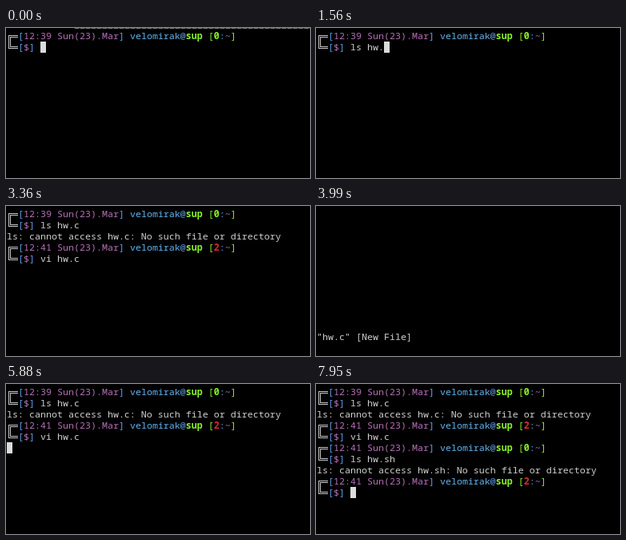
These frames come from a looping animation (380x188 px, 8 s). An HTML page:

```html
<!DOCTYPE html>
<html lang="en">
<head>
<meta charset="utf-8">
<title>Terminal session</title>
<style>
html, body { margin: 0; width: 100%; height: 100%; overflow: hidden; background: #000; }
#term {
  position: absolute; left: 0; top: 0; width: 380px; height: 188px;
  overflow: hidden; background: #000; color: #d0d0d0;
  font: 11.667px/14px "Noto Sans Mono", "DejaVu Sans Mono", monospace;
  font-variant-ligatures: none;
}
.row { position: absolute; left: 1px; height: 14px; white-space: pre; }
.blue { color: #5f9fee; }
.mauve { color: #b56fb5; }
.user { color: #62b4ee; }
.green { color: #87f02c; }
.red { color: #e02834; }
.inc { color: #62b4e4; }
.lib { color: #86c440; }
.dim { color: #263038; }
b { font-weight: 600; }
.status { color: #fff; font-weight: 600; }
.tag { display: inline-block; height: 14px; vertical-align: top; background: #d75f5f; color: #1c0808; }
.link {
  position: absolute; left: 3px; width: 12px; height: 17px; box-sizing: border-box;
  border: 3px double #c8c8c8; border-right: 0;
}
.cursor { position: absolute; width: 7px; height: 14px; background: #dcdcdc; }
.edge {
  position: absolute; left: 86px; top: 0; width: 294px; height: 1px;
  background: repeating-linear-gradient(90deg, #777 0 5px, #333 5px 7px);
}
</style>
</head>
<body>
<div id="term"></div>
<script>
const LOOP = 8000, CELL = 7, LINE = 14, LEFT = 1, TOP = 3;
const term = document.getElementById('term');
const paint = (name, text) => `<span class="${name}">${text}</span>`;
const bold = (name, text) => `<b class="${name}">${text}</b>`;
const open = paint('blue', '['), close = paint('blue', ']');

const header = (clock, code) =>
  '  ' + open + paint('mauve', clock + ' Sun(23).Mar') + close + ' ' +
  paint('user', 'velomirak') + paint('blue', '@') + bold('green', 'sup') + ' ' +
  paint('green', '[') + bold(code ? 'red' : 'green', code) +
  paint('blue', ':') + paint('mauve', '~') + paint('green', ']');
const missing = file => `ls: cannot access ${file}: No such file or directory`;

const include = lib => paint('inc', '#include') + ' ' + paint('lib', `&lt;${lib}&gt;`);
const source = [
  include('stdio.h'), include('stdlib.h'), '',
  'int main(int argc, char const* argv[]) {', '',
  '    fflush(stdout);',
  '    if (ferror(stdout)) exit(EXIT_FAILURE);',
  '    return EXIT_SUCCESS;', '}', paint('dim', '~')
];
const status = paint('status', paint('tag', '1 ') + ' ~/hw.c [c,utf-8,unix] o@o' +
  ' '.repeat(21) + paint('tag', '12:41'));
const notice = '"hw.c" [New File]';

const events = [];
const at = (time, change) => events.push([time, change]);
const cursor = (row, col) => s => { s.cursor = row === undefined ? null : [row, col]; };

function prompt(time, row, clock, code, delay = 0) {
  at(time, s => { s.rows[row] = header(clock, code); });
  at(time + delay, s => {
    s.rows[row + 1] = '  ' + open + paint('mauve', '$') + close + ' ';
    s.links.push(row);
    s.cursor = [row + 1, 6];
  });
}
function type(row, text, times) {
  times.forEach((time, i) => at(time, s => {
    s.rows[row] += text[i];
    s.cursor = [row, s.cursor ? s.cursor[1] + 1 : 7];
  }));
}
const print = (time, row, text) => at(time, s => { s.rows[row] = text; });

// First listing
prompt(0, 0, '12:39', 0);
at(0, s => { s.edge = true; });
at(90, s => { s.edge = false; });
type(1, 'ls hw.c', [700, 900, 1110, 1230, 1400, 1560, 1710]);
at(1820, cursor(2, 0));
print(1920, 2, missing('hw.c'));
prompt(2020, 3, '12:41', 2, 100);

// Editor
type(4, 'vi hw.c', [2430, 2550, 2670, 2790, 2910, 3030, 3150]);
at(3360, cursor());
at(3600, s => { s.editor = []; });
at(3740, s => { s.editor[11] = notice; });
at(4000, s => { s.editor = [...source, '', notice]; });
at(4140, s => { s.editor[10] = status; });
at(4300, cursor(4, 3));
[':', ':q', ':q!'].forEach((text, i) => at(5010 + i * 200, s => {
  s.editor[11] = text;
  s.cursor = [11, text.length];
}));
at(5790, cursor());
at(5880, s => { s.editor = null; s.cursor = [5, 0]; });

// Second listing
prompt(5910, 5, '12:41', 0, 90);
type(6, 'ls hw', [6180, 6300, 6450, 6600, 6750]);
type(6, '.sh', [6930, 7110, 7290]);
at(7500, cursor(7, 0));
print(7700, 7, missing('hw.sh'));
prompt(7800, 8, '12:41', 2, 150);

function draw(count) {
  const s = { rows: [], links: [], editor: null, cursor: null, edge: false };
  events.slice(0, count).forEach(([, change]) => change(s));
  const y = row => TOP + row * LINE;
  let html = (s.editor || s.rows)
    .map((text, row) => `<div class="row" style="top:${y(row)}px">${text}</div>`).join('');
  if (!s.editor) {
    html += s.links.map(row => `<div class="link" style="top:${y(row) + 6}px"></div>`).join('');
  }
  if (s.cursor) {
    const [row, col] = s.cursor;
    html += `<div class="cursor" style="left:${LEFT + col * CELL}px;top:${y(row)}px"></div>`;
  }
  if (s.edge) html += '<div class="edge"></div>';
  term.innerHTML = html;
}

let shown = -1;
const start = performance.now();
function tick() {
  const time = Math.max(0, performance.now() - start) % LOOP;
  const count = events.filter(([when]) => when <= time).length;
  if (count !== shown) draw(shown = count);
  requestAnimationFrame(tick);
}
tick();
</script>
</body>
</html>
```
